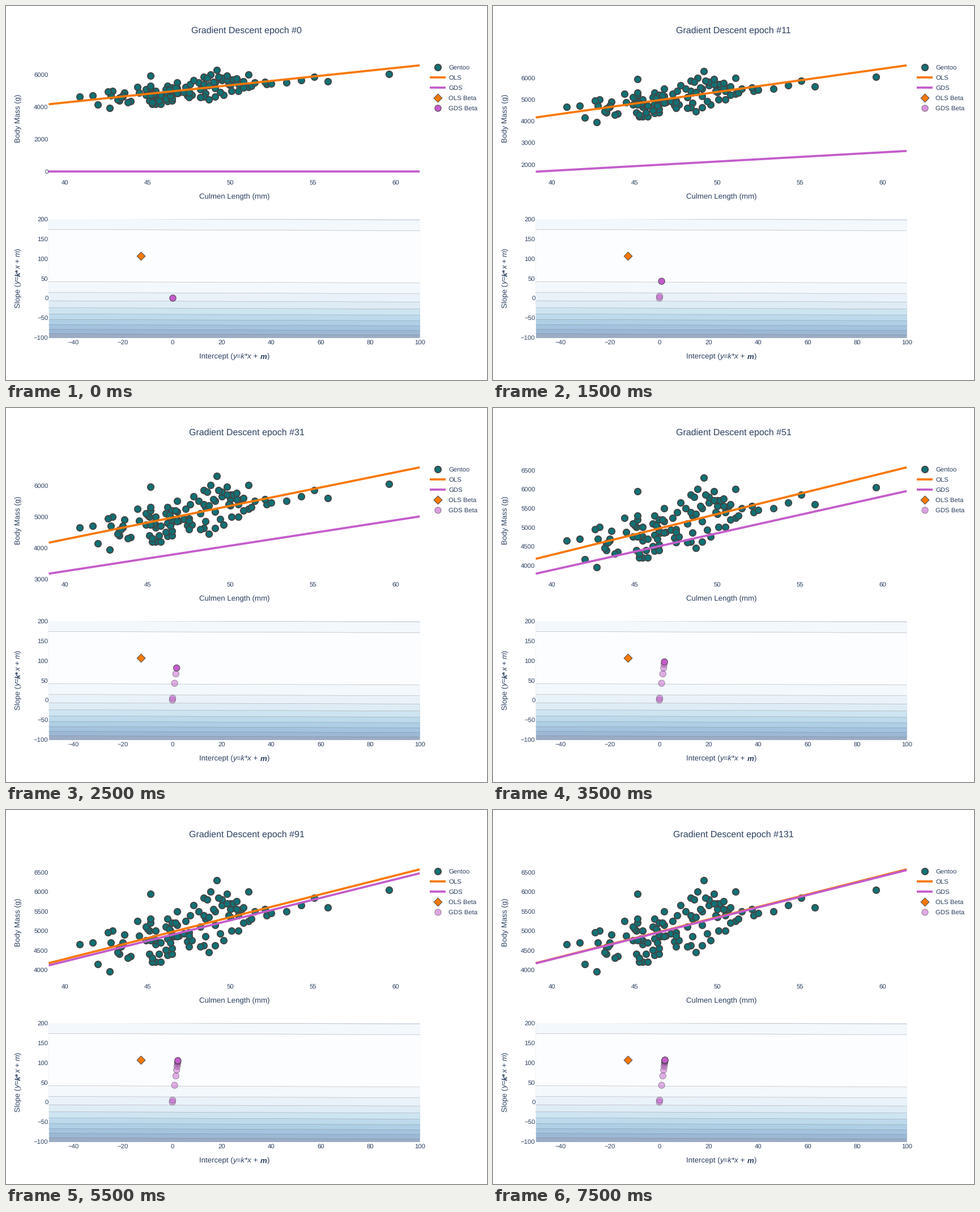
Animation, 849 px wide and 660 px high, one loop 8000 ms. Source, as a matplotlib script:

```python
import math

import matplotlib.pyplot as plt
import numpy as np
from matplotlib.animation import FuncAnimation
from matplotlib.patches import Rectangle

W, H = 849, 660
S = W / 900  # layout is designed on a 900 x 700 page
INK, EDGE = "#2a3f5f", "#444444"
TEAL, ORANGE, PURPLE = "#0f7175", "#f97806", "#c45ccb"

plt.rcParams["font.family"] = "Liberation Sans"
plt.rcParams["text.hinting"] = "none"
plt.rcParams["axes.unicode_minus"] = True

# Panel geometry in stage pixels
LEFT, RIGHT = 80 * S, 774 * S
TOP, TOP_END = 100 * S, 321 * S
LOW, LOW_END = 399 * S, 620 * S

# Model parameters
LEN_MIN, LEN_MAX = 39.03, 61.47
OLS_M, OLS_K = -12.7, 107.15
GDS_K, GDS_RATIO, RATE = 106.85, 0.0211, 0.0463
MASS_MIN, MASS_STEP = 3950, 50

# Culmen lengths, one row per 50 g of body mass
ROWS = [
    (42.7,), (), (), (), (42.0,), (45.3, 45.5, 45.8), (), (43.8, 45.3),
    (44.0,), (43.3, 45.1, 45.7, 46.5), (43.2, 48.7), (46.1,), (46.5,),
    (43.4, 47.5, 48.2), (40.9, 43.5, 45.5), (41.7, 42.8, 43.5, 45.8, 46.4),
    (44.9, 45.2, 45.5, 47.7, 49.6), (45.4, 46.2), (46.6, 46.8, 48.5),
    (43.6, 46.5), (42.6, 47.5), (42.9, 45.1, 45.5, 46.4, 50.1, 50.5),
    (45.0, 46.3), (44.9, 46.1, 48.2), (46.8, 49.1),
    (45.2, 46.5, 46.7, 50.8), (44.4, 47.3, 51.1), (45.2, 46.2, 48.5, 51.3),
    (48.7, 50.0), (47.6, 48.4, 49.9, 50.5, 52.2), (52.5,),
    (46.8, 48.1, 49.1, 51.5, 53.4), (49.0, 50.0, 50.4, 50.7, 52.1),
    (50.8, 55.9), (47.8, 49.5, 54.3), (49.8, 50.0, 50.2), (50.4,),
    (48.6, 49.5), (48.4, 49.3, 55.1), (), (45.2, 49.8), (48.8, 51.1),
    (59.6,), (), (), (), (), (49.2,),
]
BETWEEN_ROWS = {4375: (46.2,), 4575: (43.3,), 4625: (48.4, 49.1), 4725: (47.4,),
                4875: (44.5, 46.9, 47.5), 4925: (47.2, 49.4)}

points = [(x, MASS_MIN + MASS_STEP * i) for i, row in enumerate(ROWS) for x in row]
points += [(x, mass) for mass, row in BETWEEN_ROWS.items() for x in row]
lengths, masses = np.array(sorted(points, key=lambda p: (p[0] * 7.3) % 1)).T


def length_px(x):
    return LEFT + (x - LEN_MIN) / (LEN_MAX - LEN_MIN) * (RIGHT - LEFT)


def intercept_px(m):
    return LEFT + (m + 50) / 150 * (RIGHT - LEFT)


def slope_px(k):
    return LOW_END - (k + 100) / 300 * (LOW_END - LOW)


fig = plt.figure(figsize=((W + 1e-6) / 72, (H + 1e-6) / 72), dpi=72, facecolor="white")
ax = fig.add_axes([0, 0, 1, 1])
ax.set(xlim=(0, W), ylim=(H, 0))
ax.axis("off")


def label(x, y, text, size=12, ha="center", **kw):
    return ax.text(x, y, text, size=size * S, ha=ha, va="baseline", color=INK,
                   rotation_mode="anchor", **kw)


def advance(text, **style):
    """Advance width of a text run, spaces included."""
    widths = []
    for sample in (text + "|", "|"):
        probe = label(0, 0, sample, 14, **style)
        widths.append(probe.get_window_extent(fig.canvas.get_renderer()).width)
        probe.remove()
    return widths[0] - widths[1]


def rich_label(x, y, runs, rotation=0):
    """Centred line made of runs; style letters: i = italic, b = bold."""
    styled = [(t, dict(style="italic" if "i" in s else "normal",
                       weight="bold" if "b" in s else "normal")) for t, s in runs]
    widths = [advance(t, **st) for t, st in styled]
    pos = -sum(widths) / 2
    for (text, style), width in zip(styled, widths):
        at = (x, y - pos) if rotation else (x + pos, y)
        label(*at, text, 14, "left", rotation=rotation, **style)
        pos += width


def dots(x, y, color, diameter=12, edge=1, marker="o", **kw):
    return ax.scatter(x, y, s=(diameter * S) ** 2, c=color, marker=marker,
                      edgecolors=EDGE, linewidths=edge * S, **kw)


def thick_line(x, y, color, z):
    return ax.plot(x, y, color=color, lw=4 * S, solid_capstyle="butt", zorder=z)[0]


# Loss surface
BLUES = np.array([(247, 251, 255), (222, 235, 247), (198, 219, 239), (158, 202, 225),
                  (107, 174, 214), (66, 146, 198), (33, 113, 181), (8, 81, 156),
                  (8, 48, 107)]) / 255
BANDS, LEVEL, OPACITY = 10, 4390, 0.4
panel = Rectangle((LEFT, LOW), RIGHT - LEFT, LOW_END - LOW, fc="none", ec="none")
ax.add_patch(panel)
m_ends = np.array([-50, 100])
valley = OLS_K - (m_ends - OLS_M) * GDS_RATIO
for n in range(BANDS, 0, -1):
    t = (n - 1) / (BANDS - 1)
    shade = [np.interp(t, np.linspace(0, 1, len(BLUES)), BLUES[:, c]) for c in range(3)]
    color = 1 - OPACITY * (1 - np.array(shade))
    reach = math.sqrt(n * LEVEL)
    ax.fill_between(intercept_px(m_ends), slope_px(valley - reach), slope_px(valley + reach),
                    color=color, lw=0, zorder=1).set_clip_path(panel)
    for side in (-reach, reach):
        edge, = ax.plot(intercept_px(m_ends), slope_px(valley + side), color=EDGE,
                        alpha=OPACITY, lw=0.6, zorder=1.5)
        edge.set_clip_path(panel)

# Fixed text
for x in range(40, 61, 5):
    label(length_px(x), 315, f"{x}")
for m in range(-40, 101, 20):
    label(intercept_px(m), 597, f"{m}".replace("-", "\u2212"))
for k in range(-100, 201, 50):
    label(LEFT - 1, slope_px(k) + 4, f"{k}".replace("-", "\u2212"), ha="right")
label(403, 340.5, "Culmen Length (mm)", 14)
label(25.5, 198.5, "Body Mass (g)", 14, rotation=90)
rich_label(403, 622.5, [("Intercept (", ""), ("y=k*x + ", "i"), ("m", "bi"), (")", "")])
rich_label(25.5, 480.3, [("Slope (", ""), ("y=", "i"), ("k*", "bi"), ("x + m", "i"), (")", "")], 90)

# Legend
for row, name in enumerate(["Gentoo", "OLS", "GDS", "OLS Beta", "GDS Beta"]):
    label(781, 112 + 18 * row, name, ha="left")
DIAMOND = 12 * 1.3 / math.sqrt(2)
dots(762, 108, TEAL, edge=2)
thick_line([748, 776], [126, 126], ORANGE, 2)
thick_line([748, 776], [144, 144], PURPLE, 2)
dots(762, 162, ORANGE, DIAMOND, marker="D")
legend_beta = dots(762, 180, PURPLE)

# Moving parts
ends = np.array([LEN_MIN, LEN_MAX])
ols_ends = OLS_M + OLS_K * ends
title = label(W / 2, 47.5, "", 17)
mass_ticks = [label(LEFT - 1, 0, "", ha="right") for _ in range(9)]
cloud = dots(length_px(lengths), masses, TEAL, edge=2, zorder=3)
ols_line = thick_line(length_px(ends), ols_ends, ORANGE, 4)
gds_line = thick_line(length_px(ends), ols_ends, PURPLE, 5)
dots(intercept_px(OLS_M), slope_px(OLS_K), ORANGE, DIAMOND, marker="D", zorder=3)
trail = dots([0], [0], PURPLE, zorder=4)


def slope_at(epoch):
    return GDS_K * (1 - np.exp(-RATE * np.asarray(epoch)))


def nice_step(span):
    rough = span / ((TOP_END - TOP) / S / 40 + 1)
    base = 10 ** math.floor(math.log10(rough))
    return next(base * f for f in (1, 2, 5, 10) if base * f >= rough)


def with_alpha(color, alphas):
    return [(*plt.matplotlib.colors.to_rgb(color), a) for a in alphas]


def update(step):
    epochs = [0] + [10 * i + 1 for i in range(step - 1)]
    epoch = epochs[-1]
    k = slope_at(epoch)
    gds_ends = k * (ends + GDS_RATIO)
    title.set_text(f"Gradient Descent epoch #{epoch}")

    # Autorange: 5% margins, plus room for markers
    highest = ols_ends[1]
    margin = 0.05 * (TOP_END - TOP)
    room = TOP_END - TOP - 2 * margin
    scale = min(room / (highest - gds_ends[0]),
                (room - 7.5 * S) / (highest - MASS_MIN))

    def mass_px(y):
        return TOP + margin + (highest - y) * scale

    cloud.set_offsets(np.column_stack([length_px(lengths), mass_px(masses)]))
    ols_line.set_ydata(mass_px(ols_ends))
    gds_line.set_ydata(mass_px(gds_ends))

    top_value = highest + margin / scale
    low_value = top_value - (TOP_END - TOP) / scale
    gap = nice_step(top_value - low_value)
    first = math.ceil(low_value / gap) * gap
    for i, tick in enumerate(mass_ticks):
        value = first + i * gap
        tick.set_text(f"{value:.0f}" if value <= top_value else "")
        tick.set_y(mass_px(value) + 4)

    slopes = slope_at(epochs)
    alphas = [0.5] * (len(epochs) - 1) + [1]
    trail.set_offsets(np.column_stack([intercept_px(GDS_RATIO * slopes), slope_px(slopes)]))
    for marks, opacity in ((trail, alphas), (legend_beta, [np.mean(alphas)])):
        marks.set_facecolor(with_alpha(PURPLE, opacity))
        marks.set_edgecolor(with_alpha(EDGE, opacity))
    return []


anim = FuncAnimation(fig, update, frames=16, interval=500, repeat=True, repeat_delay=0)
plt.show()
```
